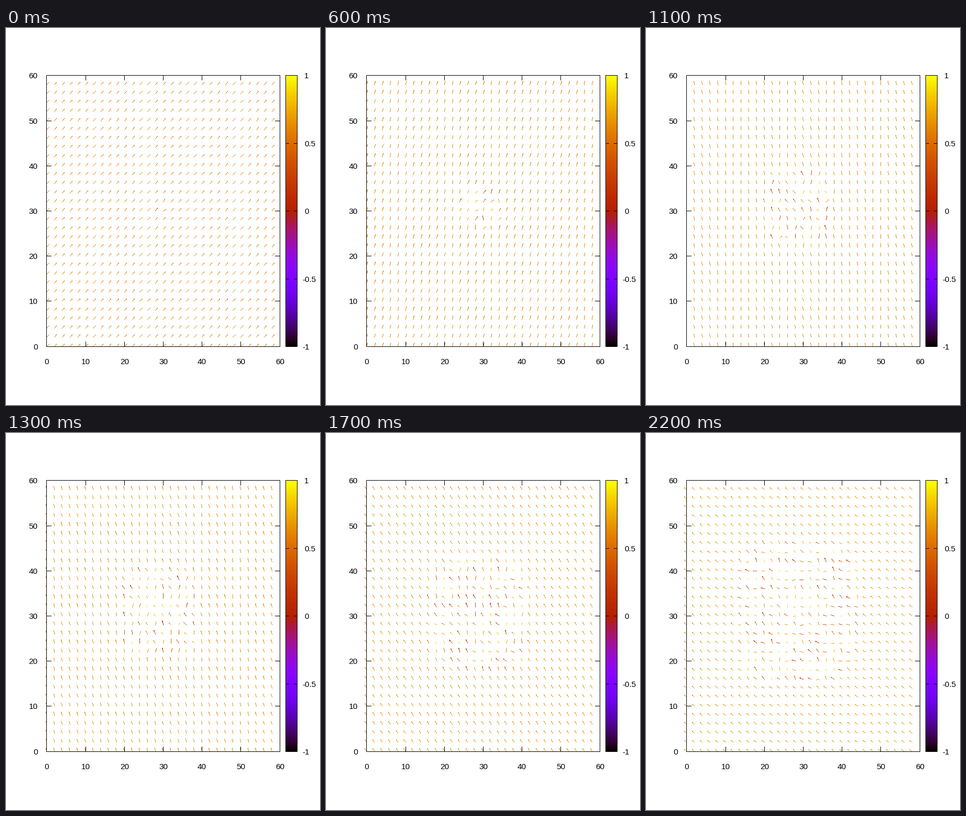
Write a matplotlib script that moves like this. It is 600x720 px and loops after 2300 ms.

```python
import numpy as np
import matplotlib.pyplot as plt
from matplotlib.animation import FuncAnimation
from matplotlib.patches import Rectangle

W, H = 600, 720
LEFT, RIGHT, TOP, BOTTOM = 77, 523, 90, 608
BAR_L, BAR_R = 534, 556
X0, Y0 = LEFT + 0.8, 0.8            # data origin, y counted up from BOTTOM
SX, SY = (RIGHT - X0) / 60, (BOTTOM - TOP - Y0) / 60
FRAMES, INTERVAL = 23, 100
TIC, HEAD, HEAD_ANGLE = 9, 0.3, np.radians(10)

plt.rcParams["font.family"] = "Liberation Sans"
fig = plt.figure(figsize=(W / 100, H / 100), dpi=100, facecolor="white")
ax = fig.add_axes([0, 0, 1, 1])
ax.axis("off")


def to_px(x, y):
    """Whole pixels for data coordinates, y upwards."""
    return np.floor(X0 + SX * x + 1e-6), np.floor(Y0 + SY * y + 1e-6)


def palette(z):
    """Black-violet-red-yellow ramp for z in -1..1."""
    g = np.clip((np.asarray(z) + 1) / 2, 0, 1)
    g = np.round(g * 127) / 127
    blue = np.clip(np.sin(2 * np.pi * g), 0, 1)
    return np.stack([np.sqrt(g), g ** 3, blue], axis=-1)


def bar(x0, y0, x1, y1):
    """Black rule covering the pixels x0..x1, y0..y1."""
    ax.add_patch(Rectangle((x0, y0), x1 - x0 + 1, y1 - y0 + 1,
                           fc="black", lw=0, zorder=3))


def frame(x0, y0, x1, y1):
    bar(x0, y0, x1, y0)
    bar(x0, y1, x1, y1)
    bar(x0, y0, x0, y1)
    bar(x1, y0, x1, y1)


def label(x, y, s, ha):
    ax.text(x, y, s, ha=ha, va="center_baseline", fontsize=15.2 * 0.72,
            color="black", zorder=4)


def draw_scales():
    frame(LEFT, TOP, RIGHT, BOTTOM)
    for v in range(0, 61, 10):
        x, up = to_px(v, v)
        y = BOTTOM - up
        bar(x, TOP, x, TOP + TIC)
        bar(x, BOTTOM - TIC, x, BOTTOM)
        bar(LEFT, y, LEFT + TIC, y)
        bar(RIGHT - TIC, y, RIGHT, y)
        label(x + 0.5, 636, str(v), "center")
        label(60.5, y + 0.5, str(v), "right")

    ramp = palette(np.linspace(1, -1, 128))[:, None, :]
    ax.imshow(ramp, extent=(BAR_L, BAR_R + 1, BOTTOM, TOP),
              interpolation="nearest", aspect="auto", zorder=2)
    frame(BAR_L, TOP, BAR_R, BOTTOM)
    for v in (-1, -0.5, 0, 0.5, 1):
        y = BOTTOM - int((v + 1) / 2 * (BOTTOM - TOP))
        bar(BAR_L, y, BAR_L + 6, y)
        bar(BAR_R - 6, y, BAR_R, y)
        label(566 if v < 0 else 570, y + 0.5, f"{v:g}", "left")


# Spin lattice: every site precesses, a disturbance spreads from the middle
grid = np.arange(0, 60, 2)
gx, gy = (a.ravel() for a in np.meshgrid(grid, grid))
dist = ((gx - 29.0) ** 4 + (gy - 30.5) ** 4) ** 0.25
rng = np.random.default_rng(7)
phase = rng.uniform(0, 2 * np.pi, gx.size)
speed = rng.uniform(0.45, 1.0, gx.size)
size = rng.uniform(0.4, 1.0, gx.size)


def spins(n):
    """Azimuth in radians and z component of every spin."""
    reach = size * np.clip((2.6 + 0.68 * n - dist) / 3, 0, 1)
    turn = phase + speed * n
    swing = np.sin(turn)
    azimuth = 45 + 4.9 * n - 0.02 * n * n
    azimuth = azimuth + 45 * reach * np.cos(turn) * (1 + np.maximum(swing, 0))
    z = 0.577 + 0.004 * n + reach * swing * np.where(swing > 0, 0.3, 0.5)
    return np.radians(azimuth), np.clip(z, -1, 0.98)


def plot_segments(img, x0, y0, x1, y1, rgb):
    """One-pixel lines without smoothing."""
    dx, dy = x1 - x0, y1 - y0
    steps = np.maximum(np.maximum(abs(dx), abs(dy)), 1)
    for k in range(int(steps.max()) + 1):
        t = np.minimum(k / steps, 1)
        px = np.floor(x0 + dx * t + 0.5).astype(int)
        py = BOTTOM - np.floor(y0 + dy * t + 0.5).astype(int)
        img[py, px, :3] = rgb
        img[py, px, 3] = 1


def render(n):
    img = np.zeros((H, W, 4))
    azimuth, z = spins(n)
    rgb = palette(z)
    flat = np.sqrt(1 - z * z)
    x0, y0 = to_px(gx, gy)
    x1, y1 = to_px(gx + flat * np.cos(azimuth), gy + flat * np.sin(azimuth))
    plot_segments(img, x0, y0, x1, y1, rgb)

    dx, dy = HEAD * (x0 - x1), HEAD * (y0 - y1)
    for a in (HEAD_ANGLE, -HEAD_ANGLE):
        hx = np.trunc(dx * np.cos(a) - dy * np.sin(a))
        hy = np.trunc(dx * np.sin(a) + dy * np.cos(a))
        plot_segments(img, x1, y1, x1 + hx, y1 + hy, rgb)
    return img


draw_scales()
field = ax.imshow(np.zeros((H, W, 4)), extent=(0, W, H, 0),
                  interpolation="nearest", aspect="auto", zorder=1)
ax.set_xlim(0, W)
ax.set_ylim(H, 0)


def update(n):
    field.set_data(render(n))
    return (field,)


anim = FuncAnimation(fig, update, frames=FRAMES, interval=INTERVAL,
                     init_func=lambda: update(0), repeat=True, repeat_delay=0)
plt.show()
```
